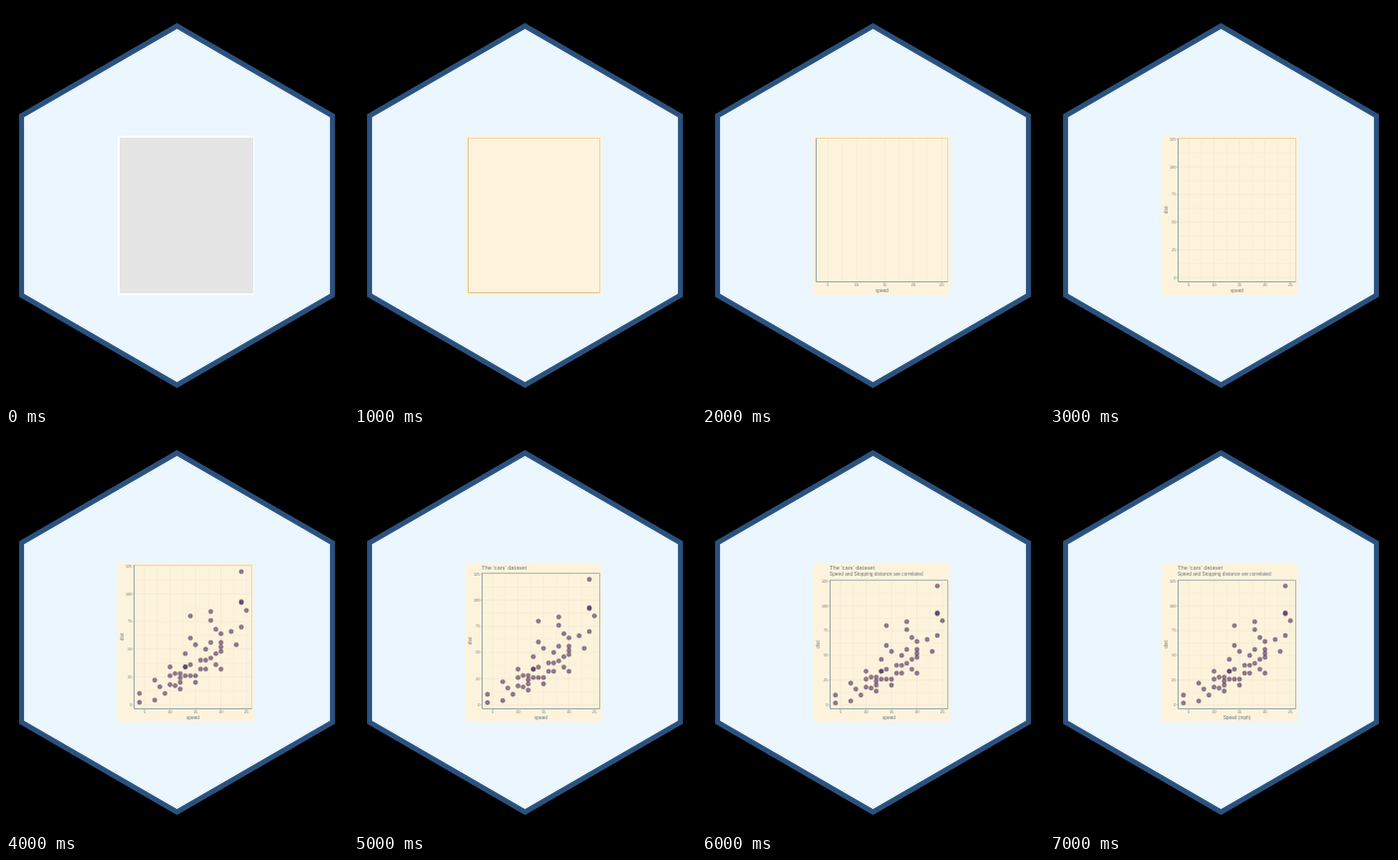
An HTML page with a canvas for the animation above (8 s loop, 343x400 px).

```html
<!DOCTYPE html>
<html lang="en">
<head>
<meta charset="utf-8">
<title>Building a scatter plot</title>
<style>
html, body { margin: 0; width: 100%; height: 100%; overflow: hidden; background: #000; }
canvas { display: block; }
</style>
</head>
<body>
<canvas id="stage" width="343" height="400"></canvas>
<script>
const ctx = document.getElementById('stage').getContext('2d');

// Stopping distances grouped by speed
const cars = {
  4: [2, 10], 7: [4, 22], 8: [16], 9: [10], 10: [18, 26, 34], 11: [17, 28],
  12: [14, 20, 24, 28], 13: [26, 34, 34, 46], 14: [26, 36, 60, 80],
  15: [20, 26, 54], 16: [32, 40], 17: [32, 40, 50], 18: [42, 56, 76, 84],
  19: [36, 46, 68], 20: [32, 48, 52, 56, 64], 22: [66], 23: [54],
  24: [70, 92, 93, 120], 25: [85]
};
const CREAM = '#fdf3dc', GREY = '#98a5a3', INK = '#657479';

function line(x1, y1, x2, y2, color, width = 0.7) {
  ctx.strokeStyle = color;
  ctx.lineWidth = width;
  ctx.beginPath();
  ctx.moveTo(x1, y1);
  ctx.lineTo(x2, y2);
  ctx.stroke();
}

function text(str, x, y, size, align = 'left', color = INK) {
  ctx.font = `${size}px "Liberation Sans", Arial, sans-serif`;
  ctx.textAlign = align;
  ctx.fillStyle = color;
  ctx.fillText(str, x, y);
}

function rect(x, y, w, h, color) {
  ctx.fillStyle = color;
  ctx.fillRect(x, y, w, h);
}

function hexagon() {
  ctx.beginPath();
  for (let i = 0; i < 6; i++) {
    const a = i * Math.PI / 3;
    ctx.lineTo(171.5 + 180 * Math.sin(a), 200 - 180 * Math.cos(a));
  }
  ctx.closePath();
  ctx.fillStyle = '#ebf6ff';
  ctx.fill();
  ctx.strokeStyle = '#2b527f';
  ctx.lineWidth = 5;
  ctx.stroke();
}

function plot(step) {
  if (step === 0) {
    rect(112, 130, 137, 160, '#fff');
    rect(114, 132, 134, 156, '#e5e5e5');
    return;
  }
  rect(112, 130, 137, 160, CREAM);

  const hasX = step >= 2, hasY = step >= 3;
  const left = hasY ? 128.5 : 114.5, right = 246.5;
  const top = step >= 6 ? 147.5 : step >= 5 ? 140.5 : 132.5;
  const bottom = hasX ? 276.5 : 287.5;
  const px = v => left + (v - 2.95) / 23.1 * (right - left);
  const py = v => bottom - (v + 3.9) / 129.8 * (bottom - top);

  // Grid, axis ticks and labels
  const gridColor = major => major ? '#efe8d1' : '#f5edd7';
  if (hasX) {
    for (let v = 5; v <= 25; v += 2.5) {
      const major = v % 5 === 0;
      line(px(v), top, px(v), bottom, gridColor(major));
      if (!major) continue;
      line(px(v), bottom, px(v), bottom + 1.5, GREY, 0.5);
      text(v, px(v), 281.4, 3.84, 'center');
    }
    text(step >= 7 ? 'Speed (mph)' : 'speed', (left + right) / 2, 287, 4.8, 'center');
  }
  if (hasY) {
    for (let v = 0; v <= 125; v += 12.5) {
      const major = v % 25 === 0;
      line(left, py(v), right, py(v), gridColor(major));
      if (!major) continue;
      line(left - 1.5, py(v), left, py(v), GREY, 0.5);
      text(v, 126.3, py(v) + 1.4, 3.84, 'right');
    }
    ctx.save();
    ctx.translate(117.8, (top + bottom) / 2);
    ctx.rotate(-Math.PI / 2);
    text('dist', 0, 0, 4.8, 'center');
    ctx.restore();
  }

  // Points
  if (step >= 4) {
    ctx.fillStyle = 'rgba(84, 44, 92, 0.62)';
    ctx.strokeStyle = 'rgba(60, 36, 78, 0.4)';
    ctx.lineWidth = 0.6;
    for (const speed in cars) {
      for (const dist of cars[speed]) {
        ctx.beginPath();
        ctx.arc(px(+speed), py(dist), 2.2, 0, 2 * Math.PI);
        ctx.fill();
        ctx.stroke();
      }
    }
  }

  // Panel border
  const dark = hasX ? GREY : '#d8c698';
  const light = step >= 5 ? '#b0b8b0' : '#e8daa8';
  line(left, top, right, top, light, 1);
  line(right, top, right, bottom, light, 1);
  line(left, top, left, bottom, dark, 1);
  line(left, bottom, right, bottom, dark, 1);

  if (step >= 5) text("The 'cars' dataset", 128, 136.5, 5.76);
  if (step >= 6) text('Speed and Stopping distance are correlated', 128, 143.3, 4.8);
}

function draw() {
  ctx.clearRect(0, 0, 343, 400);
  hexagon();
  plot(Math.floor(performance.now() % 8000 / 1000));
  requestAnimationFrame(draw);
}
draw();
</script>
</body>
</html>
```
